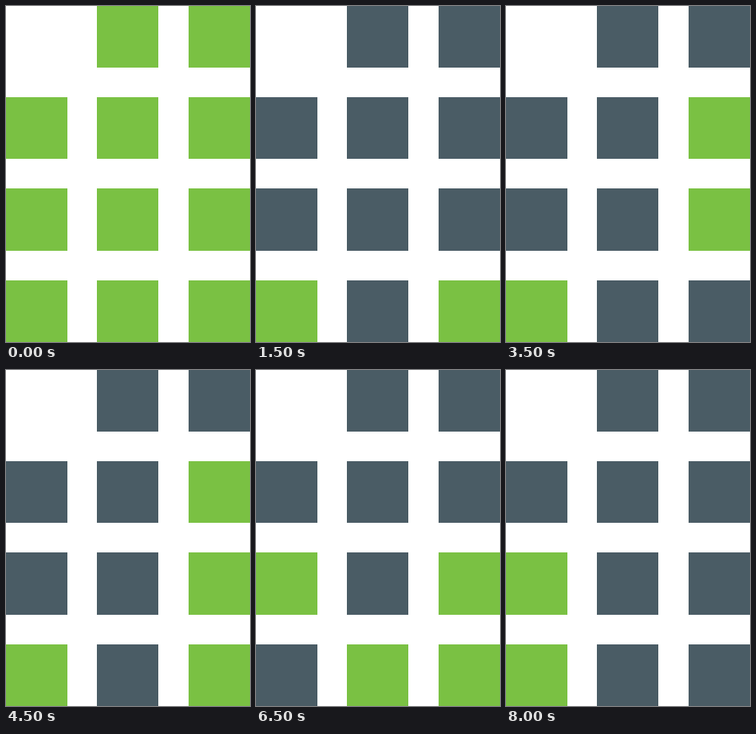
Recreate the animation shown at these times as an HTML page with a canvas. Size 306 px wide and 420 px high, loop 8.5 s.

```html
<!DOCTYPE html>
<html lang="en">
<head>
<meta charset="utf-8">
<title>Binary clock</title>
<style>
html, body { margin: 0; width: 100%; height: 100%; overflow: hidden; background: #fff; }
canvas { display: block; }
</style>
</head>
<body>
<canvas id="stage" width="306" height="420"></canvas>
<script>
const ctx = document.getElementById('stage').getContext('2d');
const STEP = 500;
const ON = '#7ac143', OFF = '#4a5c65';
const COLS = [0, 114, 229];
const ROWS = [[0, 77], [114, 77], [228, 78], [343, 77]]; // top, height for bits 8, 4, 2, 1

// One hex digit per column, one entry per step
const STATES = ['fff', '000', '100', '101', '102', '103', '104', '106', '106',
  '107', '200', '211', '212', '213', '214', '222', '300'];

function draw(state) {
  ctx.clearRect(0, 0, 306, 420);
  COLS.forEach((x, col) => {
    const digit = parseInt(state[col], 16);
    ROWS.forEach(([y, h], row) => {
      if (col === 0 && row === 0) return; // hours need only three bits
      ctx.fillStyle = digit & (8 >> row) ? ON : OFF;
      ctx.fillRect(x, y, 77, h);
    });
  });
}

const start = performance.now();
function tick(now) {
  const step = Math.floor(Math.max(0, now - start) / STEP);
  draw(STATES[step % STATES.length]);
  requestAnimationFrame(tick);
}
draw(STATES[0]);
requestAnimationFrame(tick);
</script>
</body>
</html>
```
